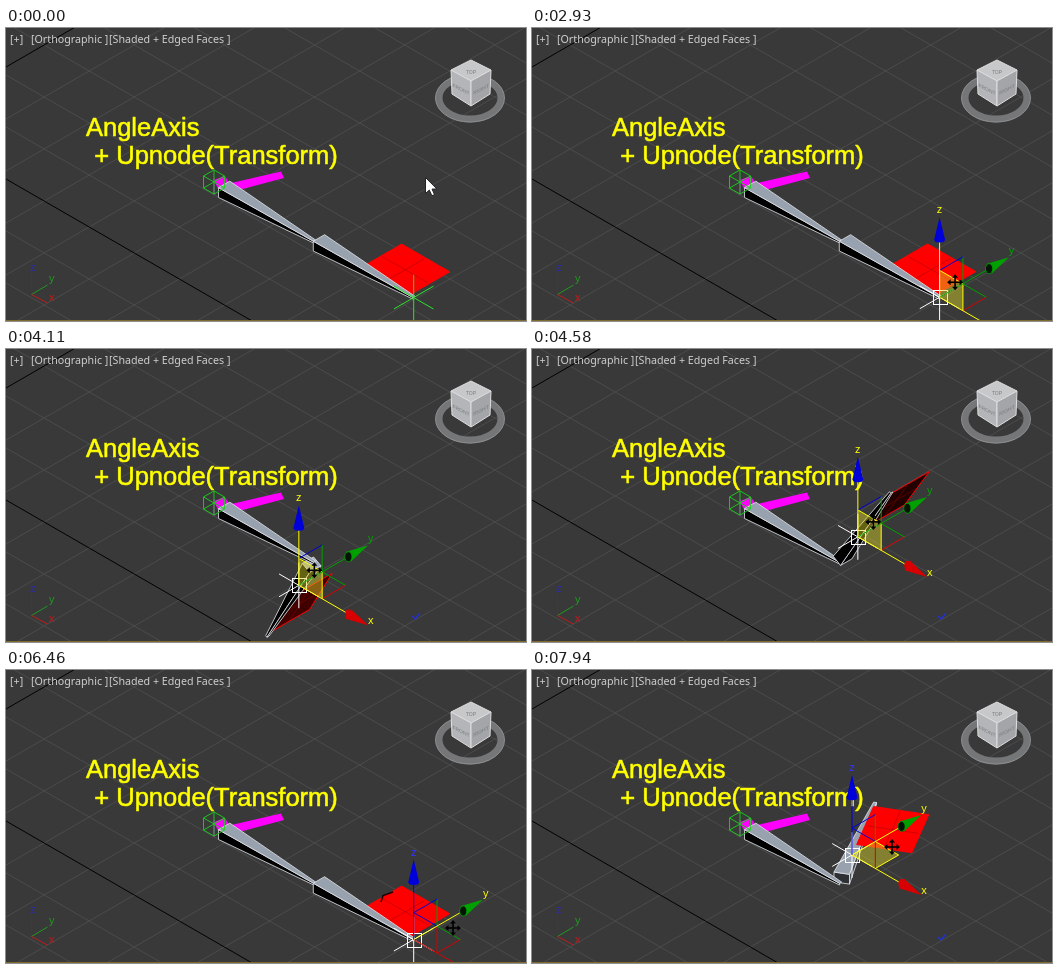
Animation of 520 by 293 pixels, one loop 8 s. Source, as an HTML page with a canvas:

```html
<!DOCTYPE html>
<html lang="en">
<head>
<meta charset="utf-8">
<title>Angle axis with up node</title>
<style>
html, body { margin: 0; width: 100%; height: 100%; overflow: hidden; background: #393939; }
canvas { display: block; width: 520px; height: 293px; }
</style>
</head>
<body>
<canvas id="view" width="520" height="293"></canvas>
<script>
const ctx = document.getElementById('view').getContext('2d');
const LOOP = 8000, BONE = 141, RAD = Math.PI / 180;
const ELBOW = [308, 212], ROOT = [208, 154];
const X = [1, 0, 0], Y = [0, 1, 0], Z = [0, 0, 1], EYE = [.577, -.577, .577];
const SANS = '"Liberation Sans", Arial, sans-serif';

// time, angle in degrees, distance of the handle from the elbow
const SIDE_DRAG = [
  [2930, 0, 141], [3150, 25, 108], [3360, 58, 66], [3570, 90, 44], [3640, 115.4, 29.6],
  [3900, 175, 42], [4120, 245, 46], [4300, 330, 66], [4430, 388, 60], [4580, 418.8, 49.2],
  [4780, 475, 36], [5130, 560.2, 49.8], [5280, 597, 45], [5670, 665, 50],
  [5820, 674, 60], [6050, 700, 105], [6300, 720, 141]
];
const FLOOR_DRAG = [
  [6760, 0, 141], [7000, -25, 112], [7250, -75, 76], [7450, -115, 68],
  [7630, -140, 62], [7800, -190, 50], [7940, -239.4, 48.3]
];
const POINTER = [
  [70, 419, 149], [140, 438, 188], [310, 438, 188], [1030, 424, 258], [1130, 424, 258],
  [1270, 440, 250], [1500, 440, 250], [1570, 501, 163], [1920, 501, 163], [2690, 424, 254]
];
const POINTER_BACK = [[6300, 423, 255], [6460, 447, 258], [6600, 447, 258], [6760, 448, 262]];

const add = (...vs) => [0, 1, 2].map(i => vs.reduce((s, v) => s + v[i], 0));
const mul = (v, k) => v.map(c => c * k);
const dot = (a, b) => a.reduce((s, c, i) => s + c * b[i], 0);
const cross = (a, b) => [a[1] * b[2] - a[2] * b[1], a[2] * b[0] - a[0] * b[2], a[0] * b[1] - a[1] * b[0]];
const unit = v => mul(v, 1 / Math.hypot(...v));
const clamp = v => Math.max(0, Math.min(1, v));
const project = ([x, y, z], [px, py]) =>
  [px + .7071 * (x + y), py + .4082 * (x - y) - .8165 * z];

function sample(keys, t) {
  const next = keys.findIndex(k => k[0] > t);
  if (next === 0) return keys[0].slice(1);
  if (next < 0) return keys[keys.length - 1].slice(1);
  const a = keys[next - 1], b = keys[next], f = (t - a[0]) / (b[0] - a[0]);
  return a.slice(1).map((v, i) => v + (b[i + 1] - v) * f);
}

function path(points, { fill, stroke, width = 1, close = true }) {
  ctx.beginPath();
  points.forEach(p => ctx.lineTo(...p));
  if (close) ctx.closePath();
  if (fill) { ctx.fillStyle = fill; ctx.fill(); }
  if (stroke) { ctx.strokeStyle = stroke; ctx.lineWidth = width; ctx.stroke(); }
}
const line = (a, b, stroke, width) => path([a, b], { stroke, width, close: false });

function label(text, x, y, color, font, align = 'left') {
  ctx.font = font;
  ctx.textAlign = align;
  ctx.fillStyle = color;
  ctx.fillText(text, x, y);
}

function ellipse(x, y, rx, ry, { fill, stroke, width = 1 }) {
  ctx.beginPath();
  ctx.ellipse(x, y, rx, ry, 0, 0, 7);
  if (fill) { ctx.fillStyle = fill; ctx.fill(); }
  if (stroke) { ctx.strokeStyle = stroke; ctx.lineWidth = width; ctx.stroke(); }
}

function drawGrid() {
  ctx.fillStyle = '#393939';
  ctx.fillRect(0, 0, 520, 293);
  for (let k = -9; k < 13; k++) {
    const down = 151 + 52 * k, up = 39 + 52 * k;
    if (k) {
      line([0, down], [520, down + 300], '#4b4b4b');
      line([0, up], [520, up - 300], '#4b4b4b');
    }
  }
  line([0, 151], [520, 451], '#000');
  line([0, 39], [520, -261], '#000');
}

function drawViewCube() {
  ellipse(464, 70, 31, 21, { stroke: '#747678', width: 7 });
  ellipse(464, 70, 34.5, 24, { stroke: '#8b8d8f' });
  const top = [465, 32], left = [445, 42], right = [485, 42], mid = [465, 53];
  const edge = '#dedede';
  path([top, right, mid, left], { fill: '#c6c8ca', stroke: edge });
  path([left, mid, [465, 78], [446, 66]], { fill: '#b3b5b8', stroke: edge });
  path([mid, right, [484, 66], [465, 78]], { fill: '#a3a5a8', stroke: edge });
  [['TOP', 465, 44, 0], ['FRONT', 455, 61, .5], ['RIGHT', 475, 61, -.5]].forEach(([text, x, y, skew]) => {
    ctx.save();
    ctx.transform(1, skew, 0, 1, x, y);
    label(text, 0, 2, '#77797c', '5px ' + SANS, 'center');
    ctx.restore();
  });
}

function drawTripod() {
  [[26, 244, 24, 243, 'z', '#2b2bb4'], [42, 257, 43, 254, 'y', '#1f9a1f'], [42, 275, 43, 273, 'x', '#c01c1c']]
    .forEach(([x, y, lx, ly, name, color]) => {
      line([25.5, 266.5], [x - .5, y], color);
      label(name, lx, ly, color, '11px ' + SANS);
    });
}

function drawTexts() {
  const head = '10.7px "Noto Sans", sans-serif';
  label('[+]', 4, 15, '#cfcfcf', head);
  label('[Orthographic ]', 25, 15, '#cfcfcf', head);
  label('[Shaded + Edged Faces ]', 103, 15, '#cfcfcf', head);
  ctx.strokeStyle = '#ff0';
  ctx.lineWidth = .6;
  [['AngleAxis', 80, 108], ['+ Upnode(Transform)', 88.3, 136]].forEach(([text, x, y]) => {
    label(text, x, y, '#ff0', '25.5px ' + SANS);
    ctx.strokeText(text, x, y);
  });
}

function drawBone(joint, axis, side, start) {
  const up = cross(axis, side);
  const ring = (s, w, h) => [[1, 1], [1, -1], [-1, -1], [-1, 1]].map(([a, b]) =>
    project(add(mul(axis, s), mul(side, a * w), mul(up, b * h)), joint));
  const base = ring(start, 8, 6), tip = ring(BONE, 1.5, 1);
  const normals = [side, mul(up, -1), mul(side, -1), up];
  const face = (points, n) => {
    if (dot(n, EYE) <= 0) return;
    const b = clamp(dot(n, [.55, 0, .95]));
    path(points, { fill: `rgb(${mul([160, 170, 184], b)})`, stroke: '#e6e9ee', width: .8 });
  };
  face(base, mul(axis, -1));
  normals.forEach((n, i) => {
    const j = (i + 1) % 4;
    face([base[i], base[j], tip[j], tip[i]], n);
  });
}

function drawFin(axis, side) {
  const at = (s, w) => project(add(mul(axis, s), mul(side, w)), ELBOW);
  const light = clamp((Math.abs(dot(cross(axis, side), EYE)) - .15) / .36);
  path([at(67, 0), at(135, 0), at(135, 57), at(67, 57)], { fill: `rgb(${255 * light},0,0)`, stroke: '#f00' });
  line(at(101, 2), at(101, 55), 'rgba(150,0,0,.6)', .7);
  line(at(69, 28), at(133, 28), 'rgba(150,0,0,.6)', .7);
}

function drawUpper() {
  path([[208, 152], [219, 148], [224, 156], [212, 161]], { fill: '#f0f' });
  path([[221, 156], [275, 143.5], [278, 150], [229, 163]], { fill: '#f0f' });
  line([208, 150], [208, 167], '#c000e0', 1.2);
  drawBone([209, 156], X, Y, 13);
  const c = 7.4, ends = [-c, c];
  ends.forEach(a => ends.forEach(b => [[[-c, a, b], [c, a, b]], [[a, -c, b], [a, c, b]], [[a, b, -c], [a, b, c]]]
    .forEach(([p, q]) => line(project(p, ROOT), project(q, ROOT), '#19d419', .9))));
}

function drawHandle(at, selected) {
  const color = selected ? '#fff' : '#2be62b';
  [X, Y, Z].forEach(a => line(project(mul(a, 28), at), project(mul(a, -28), at), color));
  if (selected) {
    ctx.strokeStyle = color;
    ctx.strokeRect(Math.round(at[0]) - 6.5, Math.round(at[1]) - 6.5, 14, 14);
  }
}

function drawGizmo(at, active) {
  const axes = { x: [X, '#d80000', 72, 39], y: [Y, '#00a000', 72, -43], z: [Z, '#0000d8', 0, -84] };
  const put = v => project(v, at);
  const yellow = '#ff0', names = ['x', 'y', 'z'], reach = 33;
  if (active.length === 2) {
    const [a, b] = [...active].map(n => mul(axes[n][0], reach));
    path([at, put(a), put(add(a, b)), put(b)], { fill: 'rgba(225,215,40,.45)' });
  }
  names.forEach(a => names.forEach(b => {
    if (a === b) return;
    const on = active.length === 2 && active.includes(a) && active.includes(b);
    const from = mul(axes[a][0], reach);
    line(put(from), put(add(from, mul(axes[b][0], reach))), on ? yellow : axes[a][1]);
  }));
  names.forEach(n => {
    const [dir, color, lx, ly] = axes[n], on = active.includes(n);
    const base = put(mul(dir, 70)), tip = put(mul(dir, 98));
    line(at, base, on ? yellow : color);
    const dx = tip[0] - base[0], dy = tip[1] - base[1], k = 5.5 / Math.hypot(dx, dy);
    path([tip, [base[0] - dy * k, base[1] + dx * k], [base[0] + dy * k, base[1] - dx * k]], { fill: color });
    if (n === 'y') ellipse(...base, 3.6, 5, { fill: '#051505', stroke: color, width: .8 });
    else ellipse(...base, n === 'z' ? 5.2 : 3, n === 'z' ? 2.5 : 4.6, { fill: color });
    label(n, at[0] + lx, at[1] + ly, on ? yellow : n === 'z' ? '#3434ff' : color, '11px ' + SANS, 'center');
  });
}

function drawArrow(x, y) {
  const shape = [[0, 0], [0, 16], [3.8, 12.6], [6.4, 18.2], [9, 17], [6.5, 11.6], [11.3, 11.4]];
  path(shape.map(([a, b]) => [x + a + .5, y + b + .5]), { fill: '#fff', stroke: '#25202a' });
}

function drawMove(x, y) {
  for (let i = 0; i < 4; i++) {
    ctx.save();
    ctx.translate(x, y);
    ctx.rotate(i * Math.PI / 2);
    line([0, 0], [0, -6], '#000', 1.6);
    path([[0, -8], [3, -4.5], [-3, -4.5]], { fill: '#000' });
    ctx.restore();
  }
}

function drawPointer(t, handle) {
  if (t < 2600) return drawArrow(...sample(POINTER, t));
  if (t < 2930) return drawMove(...sample(POINTER, t));
  if (t < 6300) return drawMove(handle[0] + 15.5, handle[1] - 15);
  if (t < 6760) return drawMove(...sample(POINTER_BACK, t));
  drawMove(handle[0] + 40, handle[1] - 8);
}

function draw(t) {
  const floor = t >= 6760;
  const [deg, reach] = sample(floor ? FLOOR_DRAG : SIDE_DRAG, t);
  const c = Math.cos(deg * RAD), s = Math.sin(deg * RAD);
  const axis = floor ? [c, s, 0] : [c, 0, s];
  const side = unit(add(Y, mul(axis, -dot(Y, axis))));
  const handle = project(mul(axis, reach), ELBOW);
  const selected = t >= 1200;

  drawGrid();
  drawTexts();
  drawViewCube();
  drawTripod();
  if (reach < 130) path([[406, 267], [409, 270], [414, 264]], { stroke: '#2030e0', width: 1.2, close: false });

  const drawLower = () => {
    const parts = [() => drawFin(axis, side), () => drawBone(ELBOW, axis, side, 7)];
    if (dot(side, EYE) > 0) parts.reverse();
    parts.forEach(part => part());
  };
  const order = [drawUpper, drawLower];
  if (dot(axis, EYE) < 0) order.reverse();
  order.forEach(part => part());

  if (t >= 6400 && t < 6600) path([[375, 232], [377, 225.5], [387, 222]], { stroke: '#200', width: 1.5, close: false });
  drawHandle(handle, selected);
  if (selected) drawGizmo(handle, t < 6380 ? 'xz' : floor ? 'xy' : 'y');
  drawPointer(t, handle);
  ctx.fillStyle = '#7d6a2c';
  ctx.fillRect(0, 292, 520, 1);
}

const begin = performance.now();
function tick() {
  draw((performance.now() - begin) % LOOP);
  requestAnimationFrame(tick);
}
tick();
</script>
</body>
</html>
```
